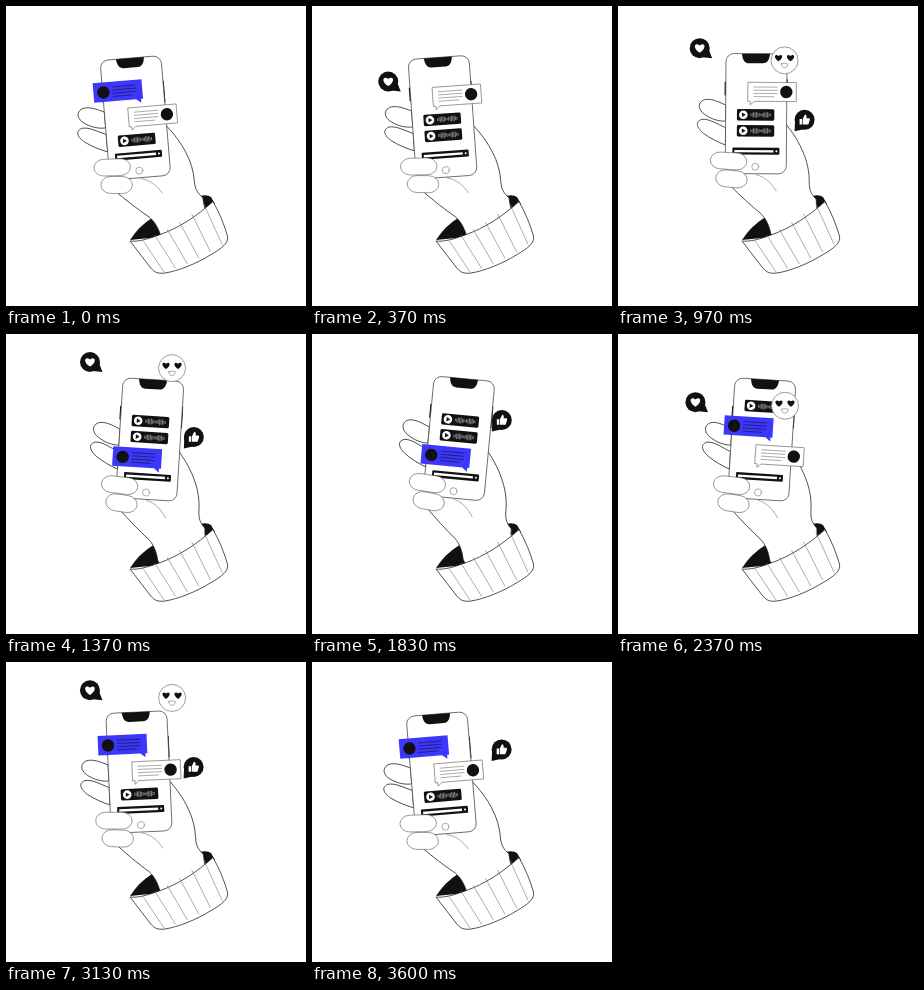
An HTML page that plays this animation: 300x300 px, repeating every 3630 ms.

```html
<!DOCTYPE html>
<html lang="en">
<head>
<meta charset="utf-8">
<title>Chat in hand</title>
<style>
  html, body { margin: 0; width: 100%; height: 100%; overflow: hidden; background: #fff; }
  svg { display: block; width: 100vw; height: 100vh; }
  .out { fill: #fff; stroke: #1a1a1a; stroke-width: .75; stroke-linejoin: round; }
  .soft { fill: #fff; stroke: #666; stroke-width: .65; stroke-linejoin: round; }
  .thin { fill: none; stroke: #808080; stroke-width: .65; stroke-linecap: round; }
  .ink { fill: #111; }
  .blue { fill: #3d37fb; }
  .white { fill: #fff; }
  .wave { stroke: #858585; stroke-width: .9; stroke-linecap: round; }
</style>
</head>
<body>
<svg viewBox="0 0 300 300">
  <defs>
    <path id="heart" d="M0 4.6C-8-.6-4.6-6.4 0-2.6C4.6-6.4 8-.6 0 4.6Z"/>
    <g id="audio">
      <rect class="ink" x="-18.700" y="-5.700" width="37.400" height="11.400" rx="1.500"/>
      <circle class="white" cx="-12.300" r="4.300"/>
      <path class="ink" d="M-13.700-2.300L-9.900 0L-13.700 2.300Z"/>
      <path class="wave" id="wave"/>
    </g>
  </defs>

  <path class="ink" d="M124 234Q133 220 146 212L194 190Q201 188 205 191L209 198L153 231Z"/>

  <g id="hand">
    <path class="out" d="M107 99.500C99 96 92 92.500 85 94.500C78 98 80 105 86 109C93 114 101 116 107 115.500Z"/>
    <path class="out" d="M107 122C99 119 91 113 83 114C75.500 117 79 123 85 128C92 133 100 137 107 139.500Z"/>
    <path class="out" d="M164 114C175 127 181 137 185 147C189 156 191 166 191 176C191 184 193 188 198 193L200 214L160 240L153 228C151 219 148 213 143 208C133 200 121 189 112 180L110 150Z"/>
    <rect class="ink" x="167" y="73" width="1.800" height="22" rx=".8"/>
    <rect class="ink" x="105.800" y="76" width="1.400" height="14" rx=".6"/>
    <rect class="out" x="107" y="48" width="61" height="120" rx="8" style="stroke:#444"/>
    <path class="ink" d="M123 48H151C150.500 54.500 148 57.500 144 57.500H130C126 57.500 123.500 54.500 123 48Z"/>
    <circle class="thin" cx="137" cy="161" r="3.500"/>
    <rect class="ink" x="114" y="142" width="47" height="7" rx=".8"/>
    <rect class="white" x="116" y="144.300" width="39" height="2.400"/>
    <circle class="white" cx="158" cy="145.500" r="1"/>
    <g id="feed">
      <g>
        <path class="blue" d="M-24.500-10H24.500V9.500H22.500V13.500L17.500 9.500H-24.500Z"/>
        <circle class="ink" cx="-14.500" r="6.200"/>
        <path d="M-5.500-4.800H18M-5.500-1.600H18M-5.500 1.600H18M-5.500 4.800H14" stroke="#17174f" stroke-width=".7"/>
      </g>
      <g>
        <path class="soft" d="M-24-9.500H24.500V9.500H-17.500L-21.500 13V9.500H-24Z"/>
        <circle class="ink" cx="14.500" r="6.200"/>
        <path class="thin" d="M-18-4.800H5.500M-18-1.600H5.500M-18 1.600H5.500M-18 4.800H2"/>
      </g>
      <g><use href="#audio"/></g>
      <g><use href="#audio"/></g>
    </g>
    <path class="thin" d="M138 169C147 171 153 177 158 185"/>
    <rect class="soft" x="97.500" y="164.800" width="31.500" height="17" rx="10" ry="8.500" transform="rotate(5 113 173)"/>
    <rect class="soft" x="92" y="147" width="36.500" height="16.800" rx="10" ry="8.400" transform="rotate(3 110 155)"/>
  </g>

  <path class="out" d="M124 235C132 236 142 233 153 229C173 222 191 210 207 195.500C213 206 218 218 221.500 230C223 237 216 242 206 248C190 258 172 265 159 267C151 268 148 266 144 261Z"/>
  <path class="thin" id="ribs"/>

  <g id="emoji">
    <circle class="soft" r="13.500"/>
    <use href="#heart" class="ink" transform="translate(-6 -2.500) scale(.75)"/>
    <use href="#heart" class="ink" transform="translate(6 -2.500) scale(.75)"/>
    <path class="thin" d="M-3.300 3.500Q0 2 3.300 3.500Q3 7.500 0 7.500Q-3 7.500-3.300 3.500Z"/>
  </g>
  <g id="love">
    <path class="ink" d="M9 1L12.500 10L3 9Z"/>
    <circle class="ink" r="10"/>
    <use href="#heart" class="white"/>
  </g>
  <g id="like">
    <path class="ink" d="M-9.500 0L-10 11.500L-1 9.500Z"/>
    <circle class="ink" r="10"/>
    <path class="white" d="M-5-.8H-2.600V4.800H-5ZM-1.900-.8L.4-5.200Q2.400-5 1.900-1.600H4.800Q5.700-1 5.200.3L4 4.200Q3.700 4.800 3 4.800H-1.900Z"/>
  </g>
</svg>
<script>
  const LOOP = 3630, HALF = LOOP / 2, BEAT = LOOP / 4;
  const FEED_LEN = 87;
  const STOPS = [0, 20, 40, 71, FEED_LEN];
  const $ = id => document.getElementById(id);
  const clamp = x => Math.max(0, Math.min(1, x));
  const ease = x => { x = clamp(x); return x * x * (3 - 2 * x); };

  // bubbles slide a little to the left as they rise; audio rows go straight up
  const rows = [...$('feed').children].map((el, i) => ({
    el, x: [123.5, 153.8, 137, 137][i], y: [80, 107, 130, 146][i], lean: i < 2 ? .08 : 0
  }));

  // each badge appears, drifts from one point to another and shrinks away, twice per loop
  const badges = [
    { el: $('love'), show: 190, hide: 1385, start: 255, span: 1110, from: [76, 77], to: [84, 28] },
    { el: $('emoji'), show: 400, hide: 1385, start: 510, span: 1000, from: [167, 72], to: [166, 32] },
    { el: $('like'), show: 790, hide: 1890, start: 860, span: 1320, from: [186.5, 114.5], to: [190.5, 80] }
  ];

  let wave = '';
  for (let i = 0; i < 15; i++) {
    const h = .5 + 2.3 * Math.abs(Math.sin(i * .42 + .2)) * (i % 2 ? .65 : 1);
    wave += `M${-4.8 + i * 1.4} ${-h}V${h}`;
  }
  $('wave').setAttribute('d', wave);

  let ribs = '';
  for (let i = 0; i < 6; i++) {
    const x = 137 + i * 12.2, y = 234.5 - i * 4.2 - i * i * .6;
    ribs += `M${x} ${y}L${x + 21 - i * .6} ${266 - i * 3.3 - i * i * .45}`;
  }
  $('ribs').setAttribute('d', ribs);

  function drawFeed(t) {
    const step = Math.floor(t / BEAT);
    const k = ease((t - step * BEAT - 20) / 340);
    const scroll = STOPS[step] + (STOPS[step + 1] - STOPS[step]) * k;
    for (const r of rows) {
      let y = r.y - scroll;
      if (y < 62) y += FEED_LEN;
      const x = r.x + (y - 96) * r.lean;
      r.el.setAttribute('transform', `translate(${x} ${y})`);
      r.el.setAttribute('opacity', Math.min(clamp((y - 68) / 6), clamp((145.5 - y) / 14)));
    }
  }

  function drawBadge(b, t) {
    const u = t >= HALF + b.show ? t - HALF : t;
    const size = ease((u - b.show) / 120) * (1 - ease((u - b.hide) / 110));
    const e = ease((u - b.start) / b.span);
    const [x, y] = b.from.map((v, i) => v + (b.to[i] - v) * e);
    b.el.setAttribute('transform', `translate(${x} ${y}) scale(${size})`);
    b.el.setAttribute('visibility', size > 0 ? 'visible' : 'hidden');
  }

  function draw(t) {
    const tilt = .3 - 5.1 * Math.cos(2 * Math.PI * (t - 55) / LOOP);
    $('hand').setAttribute('transform', `rotate(${tilt} 180 207)`);
    drawFeed(t);
    badges.forEach(b => drawBadge(b, t));
  }

  const begin = performance.now();
  function tick() {
    draw((performance.now() - begin) % LOOP);
    requestAnimationFrame(tick);
  }
  draw(0);
  requestAnimationFrame(tick);
</script>
</body>
</html>
```
